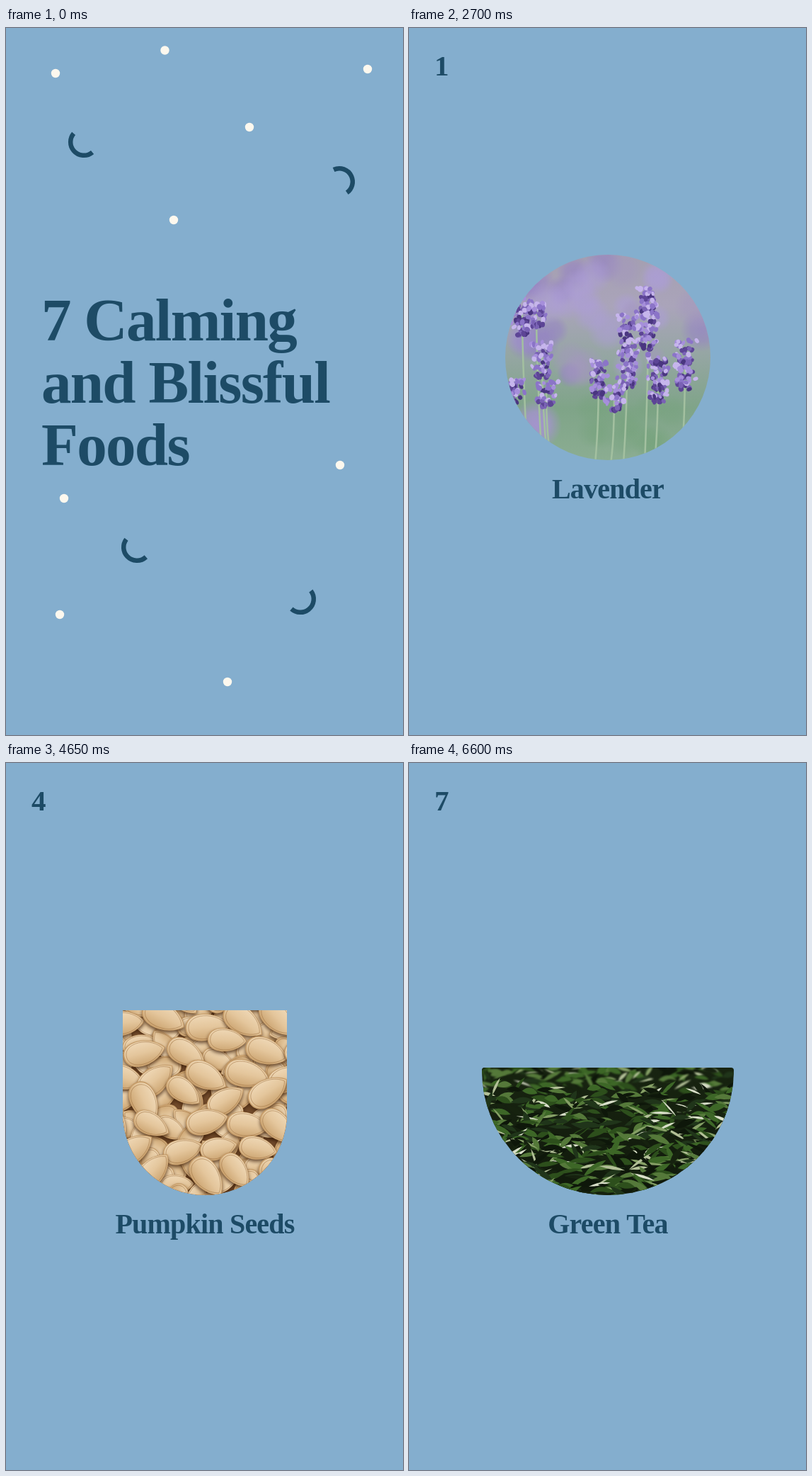
An HTML page with a canvas for the animation above (7.25 s loop, 561 px wide and 998 px high).

```html
<!DOCTYPE html>
<html lang="en">
<head>
<meta charset="utf-8">
<title>7 Calming and Blissful Foods</title>
<style>
  html, body { margin: 0; width: 100%; height: 100%; overflow: hidden; background: #84aece; }
  canvas { display: block; width: 561px; height: 998px; }
</style>
</head>
<body>
<canvas id="stage" width="561" height="998"></canvas>
<script>
const ctx = document.getElementById('stage').getContext('2d');
const BG = '#84aece', INK = '#1d4b66', CREAM = '#fdf8ee';
const FONT = '"Liberation Serif", "Noto Serif", serif';
const LOOP = 7250, HOLD = 650;
const TITLE_STEPS = 4, TITLE_END = 2700;
const TAU = Math.PI * 2, DEG = Math.PI / 180;

// Confetti: where it is at step 0 and at step 2, then optional first and last step
const dots = [
  { a: [70, 64], b: [79, 140] },
  { a: [224.5, 31.5], b: [147, 70] },
  { a: [511, 58], b: [475, 146] },
  { a: [344, 140], b: [358, 241.5] },
  { a: [237, 271], b: [91.5, 455] },
  { a: [472, 617], b: [433, 690.5] },
  { a: [82, 664], b: [37, 690.5] },
  { a: [76, 828], b: [62, 916.5] },
  { a: [313, 923], b: [305, 996], last: 1 },
  { a: [215, 663], b: [195.5, 743], first: 1 },
  { a: [285, -50], b: [297.5, 28], first: 2 }
];
// Arcs also have a start angle; each spans about half a turn
const arcs = [
  { a: [110, 161], b: [67, 238], turn: 50 },
  { a: [471, 217], b: [483, 342], turn: -115 },
  { a: [185, 733], b: [168.5, 832], turn: 47 },
  { a: [416, 806], b: [424, 906], turn: -38 },
  { a: [251, 49], b: [251, 149], turn: 129, first: 1 },
  { a: [397, -23], b: [397, 67], turn: -126, first: 2 }
];

function seeded(seed) {
  const rnd = () => {
    seed = (seed * 1664525 + 1013904223) >>> 0;
    return seed / 4294967296;
  };
  rnd.in = (lo, hi) => lo + rnd() * (hi - lo);
  rnd.pick = list => list[Math.floor(rnd() * list.length)];
  return rnd;
}

function text(str, x, y, size, spacing, align = 'left') {
  ctx.font = `bold ${size}px ${FONT}`;
  ctx.letterSpacing = spacing + 'px';
  ctx.textAlign = align;
  ctx.fillStyle = INK;
  ctx.fillText(str, x, y);
}

function oval(x, y, rx, ry, rot, fill) {
  ctx.beginPath();
  ctx.ellipse(x, y, rx, ry, rot * DEG, 0, TAU);
  ctx.fillStyle = fill;
  ctx.fill();
}

function blend(g, colors) {
  colors.forEach((c, i) => g.addColorStop(i / (colors.length - 1), c));
  return g;
}

function glow(x, y, r, rgb, alpha) {
  const g = ctx.createRadialGradient(x, y, 0, x, y, r);
  oval(x, y, r, r, 0, blend(g, [alpha, alpha * 0.8, 0].map(a => `rgba(${rgb},${a})`)));
}

function backdrop(...colors) {
  ctx.fillStyle = blend(ctx.createLinearGradient(0, 320, 0, 610), colors);
  ctx.fillRect(90, 310, 380, 310);
}

function leaf(x, y, len, wide, rot, fill) {
  ctx.save();
  ctx.translate(x, y);
  ctx.rotate(rot);
  ctx.beginPath();
  ctx.moveTo(-len, 0);
  ctx.quadraticCurveTo(0, -wide * 2, len, 0);
  ctx.quadraticCurveTo(0, wide, -len, 0);
  ctx.fillStyle = fill;
  ctx.fill();
  ctx.restore();
}

// Calls put(x, y) on a staggered, jittered grid
function scatter(rnd, dx, dy, jitter, put) {
  for (let y = 330, row = 0; y < 625; y += dy, row++) {
    for (let x = 130 + (row % 2) * dx / 2; x < 440; x += dx) {
      put(x + rnd.in(-jitter, jitter), y + rnd.in(-jitter, jitter));
    }
  }
}

// Windows that crop the pictures
const shapes = {
  circle() { ctx.arc(281, 465, 145, 0, TAU); },
  arch() {
    ctx.moveTo(165, 610);
    ctx.arc(281, 465, 116, Math.PI, TAU);
    ctx.lineTo(397, 610);
  },
  bowl() {
    ctx.moveTo(103, 434);
    ctx.quadraticCurveTo(103, 430, 107, 430);
    ctx.lineTo(455, 430);
    ctx.quadraticCurveTo(459, 430, 459, 434);
    ctx.ellipse(281, 434, 178, 176, 0, 0, Math.PI);
  },
  pocket() {
    ctx.moveTo(165, 349);
    ctx.lineTo(397, 349);
    ctx.arc(281, 494, 116, 0, Math.PI);
  }
};

// A flower head made of whorls, each with dark cups and pale tips
function sprig(rnd, x, top, bottom) {
  for (let y = top + 8; y <= bottom; y += 17) {
    for (let i = 0; i < 22; i++) {
      const t = rnd();
      oval(x + rnd.in(-1, 1) * (17 - t * 10), y - 9 + t * 19, rnd.in(2, 4), rnd.in(2.5, 4.5),
        rnd.in(-40, 40), t > 0.55 ? rnd.pick(['#5d4596', '#4a3680', '#7a62b5']) : rnd.pick(['#a68fdb', '#8b74c8', '#c6b5ec']));
    }
  }
}

function lavender() {
  const rnd = seeded(11);
  backdrop('#a49fb0', '#aaa4ba', '#94a6a2', '#7fa488', '#8bad92');
  for (let i = 0; i < 34; i++) {
    glow(rnd.in(150, 425), rnd.in(325, 490), rnd.in(16, 32), rnd.pick(['147,126,199', '172,157,215', '163,151,190']), 0.6);
  }
  glow(180, 560, 36, '167,146,212', 0.9);
  for (let i = 0; i < 14; i++) glow(rnd.in(210, 400), rnd.in(530, 610), 24, '116,162,122', 0.35);

  // x, top, bottom
  const heads = [[160, 382, 432], [180, 388, 428], [188, 444, 494], [194, 500, 540], [338, 368, 450],
    [308, 405, 505], [352, 460, 520], [268, 470, 522], [290, 505, 542], [390, 442, 508], [148, 495, 528]];
  ctx.lineWidth = 2.5;
  ctx.strokeStyle = '#a3c0a0';
  for (const [x, , y] of heads) {
    ctx.beginPath();
    ctx.moveTo(x, y - 30);
    ctx.quadraticCurveTo(x, y + 40, x + (x < 210 ? 8 : -5), 615);
    ctx.stroke();
  }
  for (const head of heads) sprig(rnd, ...head);
}

function chamomile() {
  const rnd = seeded(5);
  backdrop('#8a9c63', '#71894c', '#5d773d');
  for (let i = 0; i < 120; i++) {
    leaf(rnd.in(160, 400), rnd.in(345, 615), 16, 2, rnd() * TAU, rnd.pick(['#8fa565', '#4c692f']));
  }
  scatter(rnd, 84, 66, 9, (x, y) => {
    const r = rnd.in(30, 38);
    for (let a = 0; a < 360; a += 24) {
      oval(x + Math.cos(a * DEG) * r * 0.65, y + Math.sin(a * DEG) * r * 0.65,
        r * 0.4, r * 0.14, a, a % 48 ? '#eeece2' : '#faf8f1');
    }
    oval(x, y, r * 0.36, r * 0.34, 0, '#d9a527');
    oval(x - 2, y - 2, r * 0.24, r * 0.22, 0, '#ecc440');
  });
}

function half(x, y, turn, stone) {
  ctx.save();
  ctx.translate(x, y);
  ctx.rotate(turn * DEG);
  oval(4, 5, 46, 67, 0, 'rgba(45,45,50,.5)');
  ['#424d21', '#8fb23f', '#bfd476', '#dce3a5'].forEach((c, i) => oval(0, 0, 44 - i * 3, 65 - i * 3, 0, c));
  if (stone) {
    oval(0, 9, 24, 29, 0, '#76401d');
    const g = ctx.createRadialGradient(-5, 0, 2, 0, 9, 29);
    oval(0, 9, 23, 28, 0, blend(g, ['#d29a6a', '#b26c38', '#804520']));
  } else {
    oval(0, 9, 21, 30, 0, '#b9ad4a');
    oval(1, 12, 19, 27, 0, '#dcd26d');
    oval(1, 16, 13, 20, 0, '#eae391');
  }
  ctx.restore();
}

function avocado() {
  backdrop('#8f9097', '#85868e');
  // x, y, turn; the last two still hold their stones
  const halves = [[124, 399, 0], [175, 372, 0], [78, 490, 0], [365, 403, 90], [456, 398, 0],
    [300, 626, 90], [408, 602, 30], [164, 500, 22], [253, 455, 16], [417, 494, -38],
    [234, 562, 60], [333, 511, -6]];
  halves.forEach((h, i) => half(...h, i >= halves.length - 2));
}

function seed(x, y, rot, size) {
  const l = 31 * size, w = 17.5 * size;
  const trace = k => {
    ctx.beginPath();
    ctx.moveTo(l * k, 0);
    ctx.bezierCurveTo(l * 0.45, -w * 1.35 * k, -l * k, -w * 1.45 * k, -l * k, 0);
    ctx.bezierCurveTo(-l * k, w * 1.45 * k, l * 0.45, w * 1.35 * k, l * k, 0);
  };
  ctx.save();
  ctx.translate(x, y);
  ctx.rotate(rot * DEG);
  ctx.shadowColor = 'rgba(65,35,12,.75)';
  ctx.shadowBlur = 5;
  ctx.shadowOffsetY = 3;
  trace(1);
  ctx.fillStyle = '#c69c68';
  ctx.fill();
  ctx.shadowColor = 'transparent';
  trace(0.95);
  ctx.fillStyle = blend(ctx.createLinearGradient(0, -w, 0, w), ['#efd8b6', '#e4c69c', '#cda673']);
  ctx.fill();
  trace(0.86);
  ctx.lineWidth = 0.9;
  ctx.strokeStyle = 'rgba(157,111,62,.55)';
  ctx.stroke();
  ctx.restore();
}

function pumpkin() {
  const rnd = seeded(8);
  backdrop('#77512e', '#6a4324');
  scatter(rnd, 34, 24, 9, (x, y) => seed(x, y, rnd.in(0, 360), 0.8));
  scatter(rnd, 58, 36, 11, (x, y) => seed(x, y, rnd.in(-50, 70), rnd.in(0.85, 1.05)));
}

function berry(rnd, x, y, r) {
  const g = ctx.createRadialGradient(x - r * 0.2, y - r * 0.55, 0, x, y, r * 1.05);
  oval(x, y, r, r * 0.95, 0, blend(g, ['#a3b8cd', '#7c95b0', '#50677f', '#2d3c50', '#171e2c']));
  if (rnd() < 0.5) {
    const cx = x + rnd.in(-0.4, 0.4) * r, cy = y - rnd.in(-0.1, 0.45) * r;
    for (let a = 0; a < 360; a += 72) {
      oval(cx + Math.cos(a * DEG) * r * 0.18, cy + Math.sin(a * DEG) * r * 0.14, r * 0.16, r * 0.09, a, '#141b28');
    }
  }
}

function blueberries() {
  const rnd = seeded(21);
  backdrop('#211f24', '#1f1c1e', '#14161d');
  scatter(rnd, 37, 22.5, 4.5, (x, y) => berry(rnd, x, y, 15 + (y - 330) / 75 + rnd.in(-1, 2)));
}

function asparagus() {
  const rnd = seeded(14);
  backdrop('#566f37', '#405a2b');
  for (let x = 160; x < 405; x += 20) {
    const top = rnd.in(352, 407);
    ctx.fillStyle = blend(ctx.createLinearGradient(x - 10, 0, x + 10, 0), ['#59782f', '#a1b765', '#4b692c']);
    ctx.fillRect(x - 10, top + 25, 20, 260);
    leaf(x, top + 30, 38, 9, Math.PI / 2, '#63793f');
    for (let y = top + 10; y < 610; y += y < top + 60 ? 11 : 42) {
      leaf(x + rnd.in(-3, 3), y, 11, 4, -Math.PI / 2, rnd.pick(['#76617a', '#7c9250']));
    }
  }
}

function tea() {
  const rnd = seeded(33);
  const dark = ['#0e170a', '#16220f', '#20351a'];
  const green = ['#2d4f1c', '#3d6727', '#55793a'];
  const pale = ['#86a066', '#b3c098', '#d9dfc9'];
  backdrop('#1d2b15', '#10190b');
  for (let i = 0; i < 750; i++) {
    const depth = i / 750;
    const x = rnd.in(100, 462), y = 426 + 188 * depth + rnd.in(-9, 9);
    const tones = rnd.pick([dark, dark, green, green, pale]);
    const len = rnd.in(7, 15) + depth * 7;
    const wide = tones === pale ? rnd.in(1.5, 3.5) : rnd.in(3, 6.5);
    ctx.filter = depth < 0.18 ? 'blur(1.3px)' : 'none';
    leaf(x, y, len, wide, rnd.in(-1, 1) * rnd.in(0.2, 1.4), rnd.pick(tones));
  }
  ctx.filter = 'none';
}

const foods = [
  ['Lavender', 'circle', lavender],
  ['Chamomile', 'arch', chamomile],
  ['Avocado', 'bowl', avocado],
  ['Pumpkin Seeds', 'pocket', pumpkin],
  ['Blueberries', 'circle', blueberries],
  ['Asparagus', 'arch', asparagus],
  ['Green Tea', 'bowl', tea]
];

// Slowing progress that is 0 at step 0 and 1 at step 2
const progress = (k, drag) => k / 2 * (1 + drag * (2 - k));

function place({ a, b }, k) {
  return [a[0] + (b[0] - a[0]) * progress(k, 0.2), a[1] + (b[1] - a[1]) * progress(k, 0.067)];
}

function drawTitle(k) {
  const shown = ({ first = 0, last = 3 }) => k >= first && k <= last;
  ctx.lineWidth = 6.5;
  ctx.strokeStyle = INK;
  for (const p of arcs.filter(shown)) {
    ctx.beginPath();
    ctx.arc(...place(p, k), 18.8, p.turn * DEG, (p.turn + 170) * DEG);
    ctx.stroke();
  }
  for (const p of dots.filter(shown)) oval(...place(p, k), 6.2, 6.2, 0, CREAM);
  ['7 Calming', 'and Blissful', 'Foods'].forEach((line, i) => text(line, 50, 441 + i * 88, 85, -1.7));
}

function drawFood(i) {
  const [name, shape, picture] = foods[i];
  ctx.save();
  ctx.beginPath();
  shapes[shape]();
  ctx.closePath();
  ctx.clip();
  picture();
  ctx.restore();
  text(String(i + 1), 36, 67, 41, 0);
  text(name, 281, 664, 40, -0.8, 'center');
}

function stepAt(t) {
  return t < TITLE_END
    ? Math.min(TITLE_STEPS - 1, Math.floor(t / HOLD))
    : TITLE_STEPS + Math.floor((t - TITLE_END) / HOLD);
}

const start = performance.now();
let current = -1;
function tick(now) {
  const step = stepAt(Math.max(0, now - start) % LOOP);
  if (step !== current) {
    current = step;
    ctx.fillStyle = BG;
    ctx.fillRect(0, 0, 561, 998);
    if (step < TITLE_STEPS) drawTitle(step);
    else drawFood(step - TITLE_STEPS);
  }
  requestAnimationFrame(tick);
}
tick(start);
</script>
</body>
</html>
```
